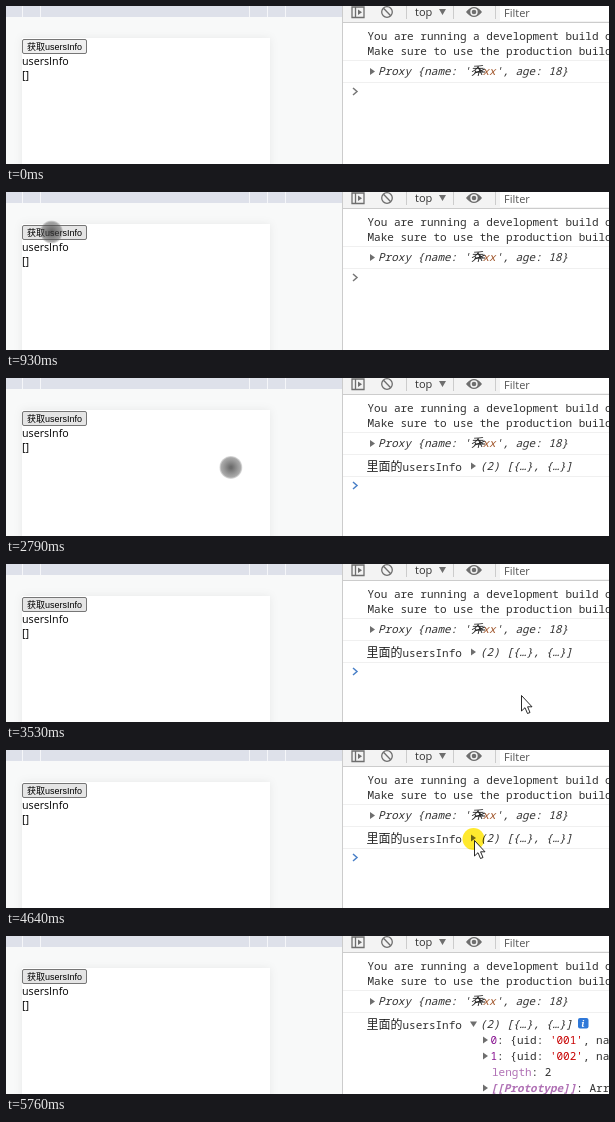
An HTML page that plays this animation: 603x158 px, repeating every 6.29 s.

```html
<!DOCTYPE html>
<html lang="zh">
<meta charset="utf-8">
<title>Console demo</title>
<style>
html, body { margin: 0; width: 100%; height: 100%; overflow: hidden; background: #fff }
svg { display: block }
text { white-space: pre; font: 11px "Noto Sans Mono", "Noto Sans CJK SC", monospace; fill: #303030 }
.ui { font: 11px "Open Sans", sans-serif; fill: #333 }
.cjk { font-size: 12px; font-family: "Noto Sans CJK SC", sans-serif; fill: #222 }
.it { font-style: italic }
.str { fill: #c80000 }
.name { fill: #a0562c }
.key { fill: #881391 }
.dim { fill: #b071b5 }
.num { fill: #303030 }
.tri { fill: #6e6e6e }
.rule { stroke: #f0f0f0 }
.sep { stroke: #ccc }
.icon { fill: none; stroke: #6e6e6e; stroke-width: 1.3 }
.sheet { fill: #fff; filter: drop-shadow(0 0 4px #0001) }
</style>
<svg width="603" height="158" viewBox="0 0 603 158">
  <defs>
    <path id="right" class="tri" d="M0-3.5L5 0 0 3.5Z"/>
    <path id="down" class="tri" d="M0-2.5H7L3.5 3Z"/>
    <radialGradient id="touch">
      <stop offset=".1" stop-color="#333" stop-opacity=".72"/>
      <stop offset=".85" stop-color="#555" stop-opacity=".5"/>
      <stop offset="1" stop-color="#777" stop-opacity=".2"/>
    </radialGradient>
  </defs>

  <!-- emulated page -->
  <rect width="337" height="158" fill="#f8f9f9"/>
  <rect width="337" height="11" fill="#dee1ea"/>
  <path d="M16.5 0V11M34.5 0V11M243.5 0V11M261.5 0V11M279.5 0V11" stroke="#f5f6f9"/>
  <rect class="sheet" x="16" y="32" width="248" height="140"/>
  <rect id="button" x="16.5" y="33.5" width="64" height="14" rx="1.500" stroke="#767676"/>
  <text x="21" y="44" style="font:9px 'Liberation Sans','Noto Sans CJK SC',sans-serif;fill:#000">获取usersInfo</text>
  <text class="ui" x="16" y="59" style="font-size:10.7px;fill:#000">usersInfo</text>
  <text class="ui" x="16" y="73" style="fill:#000">[]</text>

  <!-- devtools toolbar -->
  <rect x="337" width="266" height="158" fill="#fff"/>
  <rect x="337" width="266" height="16" fill="#f3f3f3"/>
  <path class="sep" d="M336.5 0V158M337 16.5H603M400.5 0V13M447.5 0V13M489.5 0V13"/>
  <rect x="494" width="109" height="15" fill="#fff"/>
  <g class="icon">
    <path d="M346 1H358V11.500H346ZM349.500 1V11.500"/>
    <circle cx="381" cy="6" r="5.300"/>
    <path d="M377.500 2.300L384.700 9.700"/>
  </g>
  <path class="tri" d="M352 3.500L356 6.300 352 9ZM433 3H440L436.500 9ZM460 6Q468-4 476 6 468 16 460 6Z"/>
  <circle class="tri" cx="468" cy="6" r="3" stroke="#f3f3f3" stroke-width="1.400"/>
  <text class="ui" x="409" y="10">top</text>
  <text class="ui" x="498" y="11" style="fill:#555">Filter</text>

  <!-- console -->
  <text x="361.500" y="34">You are running a development build of</text>
  <text x="361.500" y="49">Make sure to use the production build</text>
  <path class="rule" d="M337 54.500H603M337 76.500H603"/>
  <use href="#right" x="364" y="65.500"/>
  <text class="it" x="372" y="69">Proxy {name: '<tspan class="name"><tspan class="cjk">乔</tspan>xx</tspan>', age: 18}</text>
  <path d="M469 67L479 63M472 61L476 69M469 66H479" fill="none" stroke="#222"/>
  <g id="log">
    <text x="360.500" y="93"><tspan class="cjk">里面的</tspan>usersInfo</text>
    <text class="it" x="474" y="92">(2) [{…}, {…}]</text>
  </g>
  <g id="closed">
    <use href="#right" x="465" y="88"/>
    <path class="rule" d="M337 98.500H603"/>
  </g>
  <g id="open">
    <use href="#down" x="464" y="88"/>
    <rect x="572" y="82" width="10.500" height="10.500" rx="2" fill="#2f78d8"/>
    <text x="575.300" y="91" style="font:italic bold 9px 'Noto Serif',serif;fill:#fff">i</text>
    <use href="#right" x="477" y="104"/>
    <text x="484.500" y="108"><tspan class="key">0</tspan>: {uid: <tspan class="str">'001'</tspan>, name</text>
    <use href="#right" x="477" y="120"/>
    <text x="484.500" y="124"><tspan class="key">1</tspan>: {uid: <tspan class="str">'002'</tspan>, name</text>
    <text x="486" y="140"><tspan class="dim">length</tspan>: <tspan class="num">2</tspan></text>
    <use href="#right" x="477" y="152"/>
    <text x="484.500" y="156"><tspan class="dim it" style="font-weight:600">[[Prototype]]</tspan>: Array</text>
  </g>
  <path id="prompt" d="M347-3.500L351 0 347 3.500" fill="none" stroke-width="1.500"/>

  <!-- pointers -->
  <circle id="halo" cx="467.500" cy="89" r="11" fill="#ffe92e" style="mix-blend-mode:multiply"/>
  <circle id="finger" r="11.500" fill="url(#touch)"/>
  <path id="arrow" d="M.500.500V16L4 12.700 6.500 18.500 9 17.500 6.600 11.800H11Z" fill="#fff" stroke="#111" stroke-width=".9"/>
</svg>
<script>
const LOOP = 6290, STEP = 67;
const $ = id => document.getElementById(id);
const show = (id, on) => $(id).style.display = on ? '' : 'none';
const within = (t, a, b) => t >= a && t < b;

// Pointer trips: [time, x, y] points, each trip visible until its end time
const trips = [
  { end: 3000, points: [[190, 412, 148], [460, 168, 83], [790, 43.5, 39], [929, 43.5, 39], [930, 45.5, 40], [2653, 45.5, 40], [3000, 510, 168]] },
  { end: 5760, points: [[3530, 515, 131], [4150, 429, 96], [4500, 468, 90], [4843, 468, 90], [5230, 566, 133], [5430, 588, 153], [5563, 588, 153], [5760, 588, 159]] }
];

function place(points, t) {
  const i = points.findLastIndex(p => p[0] <= t);
  const a = points[i], b = points[i + 1] || a;
  const passed = t - a[0];
  const k = (passed - passed % STEP) / (b[0] - a[0] || 1);
  return [a[1] + (b[1] - a[1]) * k, a[2] + (b[2] - a[2]) * k];
}

function draw(t) {
  const logged = t >= 1790, opened = t >= 4770;
  show('log', logged);
  show('closed', logged && !opened);
  show('open', opened);
  show('prompt', !opened);
  $('prompt').setAttribute('transform', `translate(0 ${logged ? 107.5 : 85.5})`);
  $('prompt').setAttribute('stroke', logged ? '#4a80c8' : '#777');
  show('halo', within(t, 4570, 4840));
  $('button').setAttribute('fill', within(t, 1660, 1990) ? '#f5f5f5' : t < 790 ? '#efefef' : '#e5e5e5');

  const trip = trips.find(p => within(t, p.points[0][0], p.end));
  const [x, y] = trip ? place(trip.points, t) : [0, 0];
  const touching = x < 264;
  show('finger', trip && touching);
  show('arrow', trip && !touching);
  for (const id of ['finger', 'arrow']) $(id).setAttribute('transform', `translate(${x} ${y})`);
}

const start = performance.now();
function tick() {
  draw((performance.now() - start) % LOOP);
  requestAnimationFrame(tick);
}
tick();
</script>
</html>
```
